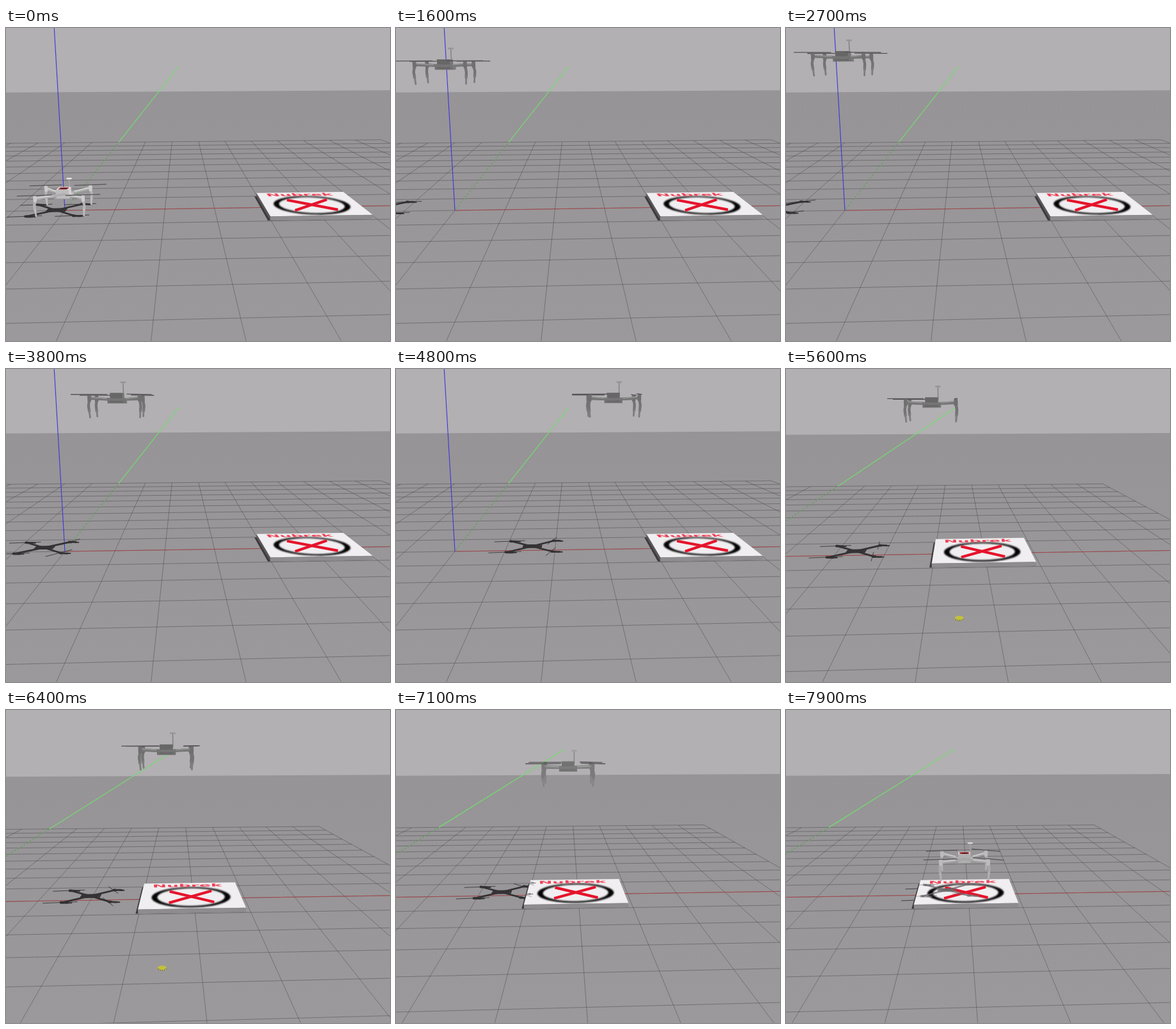
An HTML page with a canvas for the animation above (8 s loop, 600 by 489 pixels).

```html
<!DOCTYPE html>
<html lang="en">
<head>
<meta charset="utf-8">
<title>Drone landing simulation</title>
<style>
html, body { margin: 0; width: 100%; height: 100%; overflow: hidden; background: #999799; }
canvas { display: block; width: 600px; height: 489px; }
</style>
</head>
<body>
<canvas id="stage" width="600" height="489"></canvas>
<script>
const ctx = document.getElementById('stage').getContext('2d');
const W = 600, H = 489, LOOP = 8000, STEP = 100;
const FOCAL = 870, CX = 312, CY = 244.5;
const SUN = [-0.556, 0.111];

// time, screen x and y of the world origin, its depth, yaw, pitch, roll
const CAMERA = [
  [4800, 92, 285, 11.15, 0.044, 0.2125, 0.0035],
  [5400, -80, 292.5, 11.02, 0.0495, 0.2107, 0.0025],
  [5600, -85, 294, 11, 0.0495, 0.2107, 0.0025],
  [6400, -115, 301, 10.66, 0.0495, 0.2089, 0.0025],
  [7000, -111, 294.2, 11, 0.0495, 0.2107, 0.0025]
];
// time, x, height
const FLIGHT = [
  [500, 0, 0], [700, 0, 0.25], [1400, -0.02, 2.3], [1600, -0.02, 2.5], [2100, 0.05, 2.74],
  [2700, 0.14, 2.65], [3200, 0.22, 2.64], [3700, 0.95, 2.63], [4200, 2.1, 2.63],
  [4800, 3.16, 2.63], [5600, 4.01, 2.62], [6400, 4.52, 2.5], [7000, 4.8, 2.28],
  [7500, 4.91, 1.5], [7900, 4.93, 0.4]
];

// monotone cubic through one column of a table
function sample(keys, t, col) {
  const last = keys.length - 1;
  if (t <= keys[0][0]) return keys[0][col];
  if (t >= keys[last][0]) return keys[last][col];
  const slope = n => n < 0 || n >= last ? 0
    : (keys[n + 1][col] - keys[n][col]) / (keys[n + 1][0] - keys[n][0]);
  const tangent = n => {
    const a = slope(n - 1), b = slope(n);
    return a * b > 0 ? 2 * a * b / (a + b) : 0;
  };
  let i = 0;
  while (keys[i + 1][0] < t) i++;
  const span = keys[i + 1][0] - keys[i][0], s = (t - keys[i][0]) / span;
  const s2 = s * s, s3 = s2 * s;
  return keys[i][col] * (2 * s3 - 3 * s2 + 1) + keys[i + 1][col] * (3 * s2 - 2 * s3) +
    span * (tangent(i) * (s3 - 2 * s2 + s) + tangent(i + 1) * (s3 - s2));
}

let eye;
function setCamera(t) {
  const [u, v, depth, yaw, pitch, roll] = [1, 2, 3, 4, 5, 6].map(col => sample(CAMERA, t, col));
  eye = {
    x: (u - CX) / FOCAL * depth, y: (v - CY) / FOCAL * depth, depth, roll,
    sy: Math.sin(yaw), cy: Math.cos(yaw), sp: Math.sin(pitch), cp: Math.cos(pitch)
  };
}

// world point -> [screen x, screen y, pixels per metre]
function project([x, y, z]) {
  const right = x * eye.cy - y * eye.sy;
  const ahead = x * eye.sy + y * eye.cy;
  const down = -ahead * eye.sp - z * eye.cp;
  const k = FOCAL / (eye.depth + ahead * eye.cp - z * eye.sp);
  return [CX + k * (eye.x + right + eye.roll * down), CY + k * (eye.y + down - eye.roll * right), k];
}

function trace(points, map = project) {
  points.forEach((p, i) => {
    const [x, y] = map(p);
    i ? ctx.lineTo(x, y) : ctx.moveTo(x, y);
  });
}
function line(points, color, width, map) {
  ctx.beginPath();
  trace(points, map);
  ctx.strokeStyle = color;
  ctx.lineWidth = width;
  ctx.stroke();
}
function face(points, color, map) {
  ctx.beginPath();
  trace(points, map);
  ctx.closePath();
  ctx.fillStyle = color;
  ctx.fill();
}
function rect(x0, x1, y0, y1, z) {
  return [[x0, y0, z], [x1, y0, z], [x1, y1, z], [x0, y1, z]];
}
function circle(cx, cy, z, r, n = 48) {
  return Array.from({ length: n }, (_, i) => {
    const a = i / n * 2 * Math.PI;
    return [cx + r * Math.cos(a), cy + r * Math.sin(a), z];
  });
}

function drawWorld() {
  ctx.fillStyle = '#b2b0b2';
  ctx.fillRect(0, 0, W, H);
  const ground = ctx.createLinearGradient(0, 100, 0, H);
  ground.addColorStop(0, '#969496');
  ground.addColorStop(1, '#9b999b');
  const [a, b] = [project([-50, 50, 0]), project([50, 50, 0])];
  ctx.beginPath();
  ctx.moveTo(a[0], a[1]);
  ctx.lineTo(b[0], b[1]);
  ctx.lineTo(b[0], H);
  ctx.lineTo(a[0], H);
  ctx.fillStyle = ground;
  ctx.fill();

  for (let i = -10; i <= 10; i++) {
    line([[i, -10, 0], [i, 10, 0]], 'rgba(62,60,62,.48)', 0.9);
    line([[-10, i, 0], [10, i, 0]], 'rgba(62,60,62,.48)', 0.9);
  }
  line([[0, 0, 0], [50, 0, 0]], 'rgba(182,58,66,.75)', 1);
  ctx.setLineDash([4, 1.5]);
  line([[0, 0, 0], [0, 10, 0]], '#74c272', 1);
  ctx.setLineDash([]);
  line([[0, 10, 0], [0, 900, 0]], '#74da70', 1.2);
  line([[0, 0, 0], [0, 0, 6]], '#3a36dc', 1.1);
}

const PAD = { x: 4.95, y: 0, half: 0.965, top: 0.08 };

function drawPad() {
  const { x, y, half: h, top } = PAD;
  const x0 = x - h, x1 = x + h, y0 = y - h, y1 = y + h;
  const dx = SUN[0] * top, dy = SUN[1] * top;
  face(rect(x0 + dx, x1, y0 + dy, y1 + dy, 0), '#3c3a3c');
  face([[x0, y0, 0], [x0, y1, 0], [x0, y1, top], [x0, y0, top]], '#5a585a');
  face([[x0, y0, 0], [x1, y0, 0], [x1, y0, top], [x0, y0, top]], '#8e8c8e');
  face(rect(x0, x1, y0, y1, top), '#f0eef0');

  const cy = y - 0.14;
  ctx.save();
  ctx.filter = 'blur(0.8px)';
  ctx.beginPath();
  trace(circle(x, cy, top, 0.76));
  ctx.closePath();
  trace(circle(x, cy, top, 0.65));
  ctx.closePath();
  ctx.fillStyle = '#050505';
  ctx.fill('evenodd');
  ctx.filter = 'blur(0.5px)';
  for (const s of [-1, 1]) {
    line([[x - 0.42, cy - 0.42 * s, top], [x + 0.42, cy + 0.42 * s, top]], '#e5142c', 4.2);
  }
  // lettering lies flat on the far edge of the pad
  const o = project([x - 0.06, 0.63, top]);
  const r = project([x + 0.44, 0.63, top]), u = project([x - 0.06, 0.93, top]);
  ctx.transform((r[0] - o[0]) / 50, (r[1] - o[1]) / 50,
    (o[0] - u[0]) / 30, (o[1] - u[1]) / 30, o[0], o[1]);
  ctx.font = 'bold 35px "DejaVu Sans", sans-serif';
  ctx.textAlign = 'center';
  ctx.fillStyle = '#ee4055';
  ctx.fillText('Nubrek', 0, 0);
  ctx.restore();
}

const ARM = 0.455, BLADE = 0.32;

function drawDrone(pos, spin, map, shade) {
  const at = (x, y, z) => [pos[0] + x, pos[1] + y, pos[2] + z];
  const k = map(at(0, 0, 0.36))[2];
  const tone = Math.min(1, pos[2] / 2.5);
  const gray = (low, high) => {
    const v = Math.round(low + (high - low) * tone);
    return shade || `rgb(${v},${v - 1},${v})`;
  };
  const rod = (points, color, width) =>
    line(points.map(p => at(...p)), color, width * k * (shade ? 0.7 : 1), map);

  const rotor = (sx, sy) => {
    const x = sx * ARM, y = sy * ARM;
    ctx.lineCap = 'round';
    rod([[0, 0, 0.33], [x, y, 0.35]], gray(176, 118), 0.05);
    rod([[x * 0.4, y * 0.4, 0.35], [x * 0.95, y * 0.95, 0.37]], gray(216, 146), 0.022);
    rod([[x, y, 0.33], [x * 1.04, y * 1.03, 0.22], [x * 1.02, y * 1.01, 0.12]], gray(180, 116), 0.052);
    rod([[x * 1.02, y * 1.01, 0.14], [x, y, 0.01]], gray(190, 126), 0.034);
    rod([[x, y, 0.32], [x, y, 0.39]], gray(204, 112), 0.07);
    const a = sx < 0 ? 0.1 : 0.1 + spin;
    const bx = BLADE * Math.cos(a), by = BLADE * Math.sin(a);
    rod([[x - bx, y - by, 0.42], [x + bx, y + by, 0.42]], shade || '#565456', 0.016);
    ctx.lineCap = 'butt';
  };
  const box = (hx, hy, z0, z1, front, side, top) => {
    face([at(hx, -hy, z0), at(hx, hy, z0), at(hx, hy, z1), at(hx, -hy, z1)], side, map);
    face([at(-hx, -hy, z0), at(hx, -hy, z0), at(hx, -hy, z1), at(-hx, -hy, z1)], front, map);
    face(rect(-hx, hx, -hy, hy, z1).map(p => at(...p)), top, map);
  };

  rotor(-1, 1);
  rotor(1, 1);
  rod([[0.12, 0, 0.4], [0.12, 0, 0.65]], gray(170, 130), 0.018);
  rod([[0.07, 0, 0.65], [0.17, 0, 0.65]], gray(232, 150), 0.03);
  box(0.17, 0.13, 0.26, 0.33, gray(160, 112), gray(180, 124), gray(200, 128));
  box(0.12, 0.14, 0.28, 0.45, gray(190, 104), gray(212, 118), gray(228, 110));
  if (!shade && pos[2] < 2) {
    face(rect(-0.09, 0.09, -0.1, 0.1, 0.45).map(p => at(...p)), '#b03038', map);
    face(rect(-0.05, 0.06, -0.06, 0.04, 0.45).map(p => at(...p)), '#3a2224', map);
  }
  rotor(-1, -1);
  rotor(1, -1);
}

// flattens the model along the sun's rays onto a level surface
const shadowOn = level => ([x, y, z]) =>
  project([x + SUN[0] * (z - level), y + SUN[1] * (z - level), level]);

function drawMarker(t) {
  if (t < 4900 || t > 6900) return;
  const [x, y] = project([4.48, -3.5, 0]);
  ctx.beginPath();
  ctx.ellipse(x, y, 7, 4, 0, 0, 2 * Math.PI);
  ctx.fillStyle = '#c2be40';
  ctx.fill();
  ctx.beginPath();
  ctx.ellipse(x, y, 6.5, 3.5, 0, 0.2, Math.PI);
  ctx.strokeStyle = '#5e5c2c';
  ctx.lineWidth = 1.2;
  ctx.setLineDash([1.5, 1.5]);
  ctx.stroke();
  ctx.setLineDash([]);
}

function draw(t) {
  setCamera(t);
  const pos = [sample(FLIGHT, t, 1), 0, sample(FLIGHT, t, 2)];
  // the blades appear to drift slowly because they turn almost in step with the clock
  const spin = Math.max(0, t - 2000) * 0.00043;

  drawWorld();
  drawDrone(pos, spin, shadowOn(0), '#343234');
  drawPad();
  ctx.save();
  ctx.beginPath();
  const { x, y, half: h, top } = PAD;
  trace(rect(x - h, x + h, y - h, y + h, top));
  ctx.clip();
  ctx.globalAlpha = 0.6;
  drawDrone(pos, spin, shadowOn(top), '#6a686a');
  ctx.restore();
  drawMarker(t);
  drawDrone(pos, spin, project);
}

const start = performance.now();
function tick() {
  const t = (performance.now() - start) % LOOP;
  draw(Math.floor(t / STEP) * STEP);
  requestAnimationFrame(tick);
}
tick();
</script>
</body>
</html>
```
